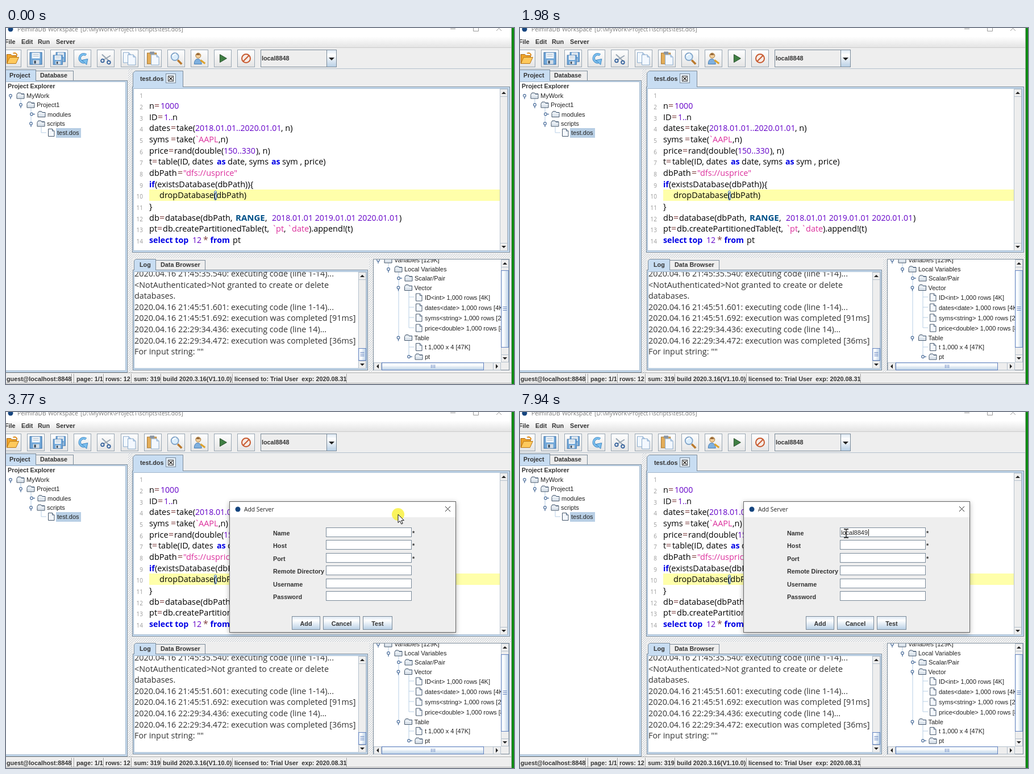
Animation of 894x626 px, one loop 8 s. Source, as an HTML page:

```html
<!DOCTYPE html>
<html lang="en">
<head>
<meta charset="utf-8">
<title>Workspace</title>
<style>
html, body { margin: 0; width: 100%; height: 100%; overflow: hidden; background: #eee; }
svg { display: block; width: 100%; height: 100%; }
text { white-space: pre; font: 11px "Liberation Sans", Arial, sans-serif; fill: #222; }
.b { font-weight: bold; font-size: 10.8px; fill: #333; }
.title { font: 10.3px "Open Sans", sans-serif; }
.code, .num, .str, .op, .key, .range { font: 14.5px "Open Sans", sans-serif; fill: #000; }
.num { font-size: 14.1px; fill: #6400c8; }
.str { fill: #dc2f9c; }
.op { font-size: 16px; fill: #804040; }
.key { font-weight: bold; font-size: 14.2px; fill: #0000e6; }
.range { font-weight: bold; font-size: 15px; fill: #005088; }
.line { font: 10px "Open Sans", sans-serif; fill: #999; text-anchor: end; }
.log { font: 14.36px "Open Sans", sans-serif; fill: #333; }
.mid { text-anchor: middle; }
</style>
</head>
<body>
<svg viewBox="0 0 894 626" preserveAspectRatio="none">
  <defs>
    <linearGradient id="metal" x2="0" y2="1">
      <stop stop-color="#dde8f3"/><stop offset=".3" stop-color="#fff"/><stop offset="1" stop-color="#b8cfe5"/>
    </linearGradient>
    <linearGradient id="metalX">
      <stop stop-color="#dde8f3"/><stop offset=".3" stop-color="#fff"/><stop offset="1" stop-color="#b8cfe5"/>
    </linearGradient>
    <linearGradient id="bar" x2="0" y2="1"><stop stop-color="#fff"/><stop offset="1" stop-color="#e4e4e4"/></linearGradient>
    <pattern id="bumps" width="4" height="4" patternUnits="userSpaceOnUse">
      <path d="M0 0h1v1h-1zM2 2h1v1h-1z" fill="#fff"/><path d="M1 1h1v1h-1zM3 3h1v1h-1z" fill="#a8b4c0"/>
    </pattern>
    <filter id="shadow" x="-10%" y="-10%" width="120%" height="125%">
      <feDropShadow dx="0" dy="2" stdDeviation="4" flood-opacity=".3"/>
    </filter>
    <clipPath id="logClip"><path d="M226 429H620V598H226Z"/></clipPath>
    <clipPath id="varClip"><path d="M647 407H871V588H647Z"/></clipPath>
  </defs>
  <g id="app"></g>
  <g id="dialog"></g>
  <circle id="halo" r="11" fill="#f8ee18" opacity=".7"/>
  <g id="menu"></g>
  <path id="arrow" d="M0 0V14.6L3.4 11.5L5.8 17L8.2 16L5.8 10.6H10.4Z" fill="#fff" stroke="#111"/>
  <path id="beam" d="M-4 -7.5H-1L0 -6.5L1 -7.5H4M0 -6.5V6.5M-4 7.5H-1L0 6.5L1 7.5H4" fill="none" stroke="#111" stroke-width="1.3"/>
</svg>
<script>
const $ = id => document.getElementById(id);
const EDGE = '#7a8a99', BLUE = '#c8ddf2', SELECT = '#b8cfe5';

const esc = s => s.replace(/&/g, '&amp;').replace(/</g, '&lt;');
const text = (x, y, s, cls = '') => `<text x="${x}" y="${y}" class="${cls}">${esc(s)}</text>`;
const fill = (x, y, w, h, color) => `<rect x="${x}" y="${y}" width="${w}" height="${h}" fill="${color}"/>`;
const box = (x, y, w, h, color, edge = EDGE) =>
  `<rect x="${x + .5}" y="${y + .5}" width="${w - 1}" height="${h - 1}" fill="${color}" stroke="${edge}"/>`;
const path = (d, color = 'none', edge = 'none', width = 1) =>
  `<path d="${d}" fill="${color}" stroke="${edge}" stroke-width="${width}"/>`;
const disc = (x, y, r, color, edge = 'none', width = 1) =>
  `<circle cx="${x}" cy="${y}" r="${r}" fill="${color}" stroke="${edge}" stroke-width="${width}"/>`;
const at = (x, y, body) => `<g transform="translate(${x} ${y})">${body}</g>`;
const button = (x, y, w, h) => box(x, y, w, h, 'url(#metal)');

// Triangle heads for scroll bars, by direction
const heads = { up: 'M-4 2L0 -2L4 2Z', down: 'M-4 -2L0 2L4 -2Z', left: 'M2 -4L-2 0L2 4Z', right: 'M-2 -4L2 0L-2 4Z' };
const scrollButton = (x, y, dir) => box(x, y, 14, 14, '#eee', '#b4c0cc') + at(x + 7, y + 7, path(heads[dir], '#222'));
const vScroll = (x, y, h) => box(x, y, 14, h, '#eee', '#b4c0cc') + scrollButton(x, y, 'up') + scrollButton(x, y + h - 14, 'down');
const grip = (x, y) => path(`M${x - 3} ${y - 2.5}h7m-7 3h7m-7 3h7`, 'none', '#6382bf');

const folder = (x, y) => at(x, y, path('M.5 3.5L2.5 .5H7L8.5 2.5H13.5V10.5H.5Z', '#dde5ed', '#44566b') +
  path('M1 4.5H13', 'none', '#fff') + path('M8.5 2.5H13.5', 'none', '#364f6d'));
const sheet = (x, y) => at(x, y, path('M.5 .5H7.5L11 4V13.5H.5Z', '#f4f8fd', '#44566b') + path('M7.5 .5V4H11', '#dce8f6', '#44566b'));
const handle = (x, y, open) => path(open ? `M${x} ${y + 2}V${y + 6}` : `M${x + 2} ${y}H${x + 6}`, 'none', '#4d6f9c', 1.3) +
  disc(x, y, 2.3, '#fff', '#4d6f9c', 1.2);
const branch = (x, y, s, open) => handle(x, y, open) + folder(x + 10.5, y - 5.5) + text(x + 28, y + 4, s);
const leaf = (x, y, s) => sheet(x, y - 7) + text(x + 16, y + 4, s);

const floppy = (x, y, s) => at(x, y, `<g transform="scale(${s})">` + box(0, 0, 22, 22, '#6fa6d8', '#3a6ea5') +
  fill(4, 1, 14, 10, '#f2f6fa') + path('M6 4H16M6 7H16', 'none', '#a8bacb') + fill(6, 14, 11, 7, '#d4dde6') + fill(8, 15, 3, 5, '#345') + '</g>');
const page = (x, y) => at(x, y, path('M.5 .5H10L14 4.5V18.5H.5Z', '#f3f8ff', '#8aaacb') + path('M10 .5V4.5H14', '#bcd5f0', '#8aaacb'));

const icons = [
  path('M-10 9V-7H-3L-1 -5H7V-1', '#f0a428', '#a86410') + path('M-10 9L-5 -2H11L6 9Z', '#ffc95c', '#b87618') + path('M1 -9Q7 -11 8 -5', 'none', '#e08a18', 2),
  floppy(-11, -11, 1),
  floppy(-6, -11, .78) + floppy(-11, -6, .78),
  path('M6 -6A7 7 0 1 0 5 6', 'none', '#3f86c4', 4.5) + path('M6 -6A7 7 0 1 0 5 6', 'none', '#7cc0ee', 2.8) + path('M-1 3L9 1L7 11Z', '#7cc0ee', '#3f86c4'),
  path('M-7 -7L5 4M8 -5L-5 3', 'none', '#97a5b3', 2) + disc(-6, 4, 2.8, 'none', '#315f9b', 1.8) + disc(5, 7, 2.8, 'none', '#315f9b', 1.8),
  page(-11, -11) + page(-3, -7),
  box(-10, -10, 17, 20, '#e3ad5a', '#a87428') + fill(-5, -12, 8, 5, '#8a96a4') + page(-3, -7),
  path('M3 3L10 10', 'none', '#b9782c', 3.5) + disc(-2, -3, 6.5, '#dceefc', '#7fa3c8', 1.8) + path('M-6 -4Q-4 -8 0 -8', 'none', '#fff', 2),
  path('M-9 10Q-9 1 -3 1T4 10Z', '#7fb0de', '#4a7fb5') + disc(-2, -5, 4.5, '#f3cf9c', '#a87c3c') + path('M-6 -6Q-3 -12 2 -6Z', '#8a5a2c') + path('M2 3L10 9', 'none', '#dda22c', 3),
  path('M-5 -7L7 0L-5 7Z', '#3f7f42', '#2c5230'),
  disc(0, 0, 7.5, '#f6ece6', '#c85a30', 2) + path('M-5 5L5 -5', 'none', '#c85a30', 2)
];

const code = [
  [],
  [[252, 'n'], [261, '=', 'op'], [272, '1000', 'num']],
  [[252, 'ID'], [267, '=', 'op'], [278, '1..', 'num'], [293, 'n']],
  [[252, 'dates'], [290, '=', 'op'], [300, 'take('], [333, '2018.01.01..2020.01.01', 'num'], [484, ', n)']],
  [[252, 'syms'], [290, '=', 'op'], [300, 'take('], [332, '`', 'str'], [339, 'AAPL', 'str'], [374, ',n)']],
  [[252, 'price'], [286, '=', 'op'], [296, 'rand(double('], [383, '150..330', 'num'], [440, '), n)']],
  [[252, 't'], [257, '=', 'op'], [268, 'table(ID, dates '], [371, 'as', 'key'], [390, 'date, syms '], [467, 'as', 'key'], [486, 'sym , price)']],
  [[252, 'dbPath'], [302, '=', 'op'], [312, '"dfs://usprice"', 'str']],
  [[252, 'if', 'key'], [262, '(existsDatabase(dbPath)){']],
  [[270, 'dropDatabase(dbPath)']],
  [[252, '}']],
  [[252, 'db'], [270, '=', 'op'], [280, 'database(dbPath, '], [404, 'RANGE', 'range'], [456, ','], [468, '2018.01.01 2019.01.01 2020.01.01', 'num'], [692, ')']],
  [[252, 'pt'], [266, '=', 'op'], [276, 'db.createPartitionedTable(t, '], [468, '`', 'str'], [475, 'pt', 'str'], [489, ','], [495, '`', 'str'], [503, 'date', 'str'], [533, ').append!(t)']],
  [[252, 'select top', 'key'], [328, '12', 'num'], [347, '*', 'op'], [359.5, 'from', 'key'], [399, 'pt']]
];

const log = [
  '2020.04.16 21:45:35.540: executing code (line 1-14)...',
  '<NotAuthenticated>Not granted to create or delete',
  'databases.',
  '2020.04.16 21:45:51.601: executing code (line 1-14)...',
  '2020.04.16 21:45:51.692: execution was completed [91ms]',
  '2020.04.16 22:29:34.436: executing code (line 14)...',
  '2020.04.16 22:29:34.472: execution was completed [36ms]',
  'For input string: ""'
];

function frame() {
  const tools = icons.map((icon, i) => box(-4 + Math.round(41.1 * i), 38, 31, 31, 'url(#bar)', '#98a6b3') + at(11.5 + 41.1 * i, 53.5, icon)).join('');
  return fill(0, 0, 894, 626, '#eee') + fill(0, 0, 889, 15, '#fff') +
    disc(8, 2, 4.5, '#15457f') +
    `<g id="caption">${text(20, 5.5, 'PelmiraDB', 'title')}${text(74, 5.5, 'Workspace', 'title')}${text(131, 5.5, '[D:\\MyWork\\Project1\\scripts\\test.dos]', 'title')}</g>` +
    '<path id="controls" d="M782 1.5H791M822.5 -4V5.5H831.5V-4M863 -4L872 5M872 -4L863 5" fill="none"/>' +
    fill(0, 15, 889, 19, 'url(#bar)') + fill(0, 34, 889, 1, '#ccc') + '<g id="menuHead"></g>' +
    [[-2, 'File'], [27, 'Edit'], [56, 'Run'], [88, 'Server']].map(([x, s]) => text(x, 28, s, 'b')).join('') +
    fill(0, 71, 889, 1, '#b4c0cc') + tools +
    box(448, 38, 134, 31, '#eee') + button(564, 38, 18, 31) + path('M568 52H578L573 57Z', '#222') + text(450, 57, 'local8848', 'b');
}

function projectPanel() {
  return box(-2, 73, 55, 22, BLUE) + box(52, 75, 67, 18, '#eee') + box(-2, 92, 216, 514, BLUE) +
    fill(0, 91, 52, 4, BLUE) + fill(0, 95, 211, 508, '#fff') + path('M0 94.5H210.5V602.5H0', 'none', '#a3b8cc') +
    text(6, 87, 'Project', 'b') + text(60, 87, 'Database', 'b') + text(3, 106, 'Project Explorer', 'b') +
    path('M26 124V135M44 140V168M62 174V184H71', 'none', SELECT) +
    branch(8, 119, 'MyWork', true) + branch(26, 135, 'Project1', true) +
    branch(45, 151.5, 'modules') + branch(44, 168, 'scripts', true) +
    fill(88, 176, 44, 17, SELECT) + leaf(74, 184, 'test.dos') +
    fill(214, 73, 8, 533, 'url(#bumps)');
}

function editorPanel() {
  const lines = code.map((tokens, i) => {
    const y = 142 + 19.65 * (i - 1);
    return text(241, y + 1, String(i + 1), 'line') + tokens.map(([x, s, cls = 'code']) => text(x, y, s, cls)).join('');
  }).join('');
  return box(222, 103, 665, 292, BLUE) + path('M223.5 104V79L227.5 75.5H311.5V104', BLUE, EDGE) + fill(224, 103, 87, 2, BLUE) +
    text(236, 93, 'test.dos', 'b') + box(281, 80, 18, 17, '#e4eef8') + box(285, 84, 10, 10, '#fff', '#333') +
    path('M287 86L293 92M293 86L287 92', 'none', '#222', 1.4) +
    box(224, 106, 660, 286, '#fff', '#a3b8cc') + fill(252, 284, 617, 20, '#ffffaa') +
    '<rect x="366.5" y="286.5" width="4" height="16" rx="2" fill="#eaf2ff" stroke="#3a6ea5"/>' + lines +
    vScroll(869, 107, 285) + fill(222, 397, 667, 8, 'url(#bumps)');
}

function logPanel() {
  return box(223, 425, 414, 177, BLUE) + path('M225.5 426V409L228.5 406.5H263.5V426', BLUE, EDGE) + box(263, 408, 88, 18, '#eee') +
    fill(226, 425, 37, 2, BLUE) + text(235, 420, 'Log', 'b') + text(272, 420, 'Data Browser', 'b') +
    box(225, 428, 410, 171, '#fff', '#a3b8cc') +
    `<g clip-path="url(#logClip)">${log.map((s, i) => text(226, 437 + 19.6 * i, s, 'log')).join('')}</g>` +
    vScroll(620, 429, 170) + box(620, 563, 14, 22, 'url(#metalX)', '#6382bf') + grip(626.5, 573) +
    fill(638, 406, 8, 199, 'url(#bumps)');
}

function variablesPanel() {
  const vectors = ['ID<int> 1,000 rows [4K]', 'dates<date> 1,000 rows [4K]', 'syms<string> 1,000 rows [20K]', 'price<double> 1,000 rows [8K]'];
  return box(646, 406, 240, 196, '#fff') + '<g clip-path="url(#varClip)">' +
    path('M673 413V424M691 429V545M709 462V527M709 473H718M709 491H718M709 509H718M709 527H718M709 549V578M709 561H718', 'none', SELECT) +
    branch(655, 408, 'Variables [129K]', true) + branch(673, 424, 'Local Variables', true) +
    branch(691, 440, 'Scalar/Pair') + branch(690.5, 456.5, 'Vector', true) +
    vectors.map((s, i) => leaf(721, 473.5 + 18 * i, s)).join('') +
    branch(690.5, 544.5, 'Table', true) + leaf(721, 561, 't 1,000 x 4 [47K]') + branch(709, 578, 'pt') + '</g>' +
    vScroll(871, 407, 181) + box(871, 426, 14, 136, 'url(#metalX)', '#6382bf') + grip(877.5, 493) +
    box(647, 588, 224, 14, '#eee', '#b4c0cc') + scrollButton(647, 588, 'left') + scrollButton(857, 588, 'right') +
    fill(871, 588, 14, 13, '#eee') +
    box(661, 588, 180, 14, 'url(#metal)', '#6382bf') + path('M748.5 592v6m3 -6v6m3 -6v6', 'none', '#6382bf');
}

function statusBar() {
  const cells = [[1, 'guest@localhost:8848'], [124, 'page: 1/1'], [175, 'rows: 12'], [225, 'sum: 319'],
    [276, 'build 2020.3.16(V1.10.0)'], [402, 'licensed to: Trial User  exp: 2020.08.31']];
  return fill(0, 606, 889, 1, '#a8a8a8') + fill(0, 607, 889, 1, '#fff') +
    cells.map(([x, s]) => text(x, 620.5, s, 'b')).join('') +
    [115, 119, 171, 220, 272, 398, 599].map(x => fill(x, 608, 1, 16, '#999') + fill(x + 1, 608, 1, 16, '#fff')).join('') +
    fill(0, 624, 889, 1, '#aaa') + '<path id="edge" d="M889.5 0V626" fill="none"/>' + fill(890, 0, 4, 626, '#0c8a12');
}

function dialogBody() {
  const rows = ['Name', 'Host', 'Port', 'Remote Directory', 'Username', 'Password'].map((label, i) => {
    const y = Math.round(46 + 22.4 * i);
    return text(77, y + 13.5, label, 'b') + box(170, y, 151, 17, '#fff') + (i < 3 ? text(322, y + 14, '*', 'b') : '');
  }).join('');
  const buttons = [[110, 50, 'Add'], [165, 65, 'Cancel'], [235, 52, 'Test']]
    .map(([x, w, s]) => button(x, 202, w, 24) + text(x + w / 2, 218.5, s, 'b mid')).join('');
  return `<g filter="url(#shadow)">${box(0, 0, 399, 231, '#eee', '#666')}</g>` + fill(1, 1, 397, 27, '#fff') +
    disc(15, 14, 4.5, '#15457f') + text(26, 18, 'Add Server', 'title') + path('M380 9L389 18M389 9L380 18', 'none', '#222') +
    rows + buttons + text(172, 59, '', 'typed') + '<path id="caret" d="M.5 49V61" stroke="#222"/>';
}

$('app').innerHTML = frame() + projectPanel() + editorPanel() + logPanel() + variablesPanel() + statusBar();
$('dialog').innerHTML = dialogBody();
$('menuHead').innerHTML = fill(82, 15, 44, 20, '#a3b8cc');
$('menu').innerHTML = box(82, 35, 76, 44, '#eee', '#6382bf') + '<g id="hover">' + fill(83, 37, 74, 18, '#a3b8cc') +
  fill(83, 37, 74, 1, '#6382bf') + fill(83, 55, 74, 1, '#6382bf') + '</g>' + text(88, 50.5, 'Add Server', 'b') + text(88, 72.5, 'Edit Server', 'b');
const typed = document.querySelector('.typed');

// Pointer: time, x, y, shape, halo
const approach = Array.from({ length: 11 }, (_, i) => {
  const p = i / 10, e = p * p * (3 - 2 * p);
  return [130 + 77 * i, 687 - 598 * e, 505 - 456 * e, 'arrow', 1];
});
const pointer = [
  [0, 0, 0, '', 0], ...approach,
  [980, 92, 38, 'arrow', 1], [1057, 98, 28, 'arrow', 1], [1133, 101, 25, 'arrow', 1],
  [1287, 104, 34, 'arrow', 1], [1363, 108, 43, 'arrow', 1], [1440, 112, 50, 'arrow', 1],
  [1827, 80, 62, 'arrow', 1], [1903, 36, 90, 'arrow', 1], [1980, 0, 0, '', 0],
  [3460, 36, 223, 'arrow', 1], [3537, 108, 197, 'arrow', 1], [3610, 225, 177.5, 'arrow', 1],
  [3690, 470, 165, 'arrow', 1], [3770, 690, 180, 'arrow', 1],
  [3920, 660, 190, 'arrow', 1], [4000, 618, 208, 'arrow', 1], [4075, 588, 221, 'arrow', 1], [4150, 577, 223, 'arrow', 1],
  [4300, 576, 221, 'arrow', 1], [4380, 578, 217, 'beam', 1], [4460, 580, 213, 'beam', 1], [4535, 582, 210, 'beam', 1],
  [4610, 583, 209, 'beam', 1], [4760, 579, 211, 'beam', 1], [4840, 574, 213.5, 'beam', 1], [4920, 574, 213.5, 'beam', 0]
];
// Field: time, typed length, caret x (0 = caret off)
const typing = [
  [0, 0, 0], [4920, 0, 172], [5380, 0, 0], [5610, 1, 175], [5840, 2, 181], [6300, 3, 187], [6380, 4, 193],
  [6460, 5, 195], [6990, 5, 0], [7450, 6, 201], [7620, 7, 208], [7770, 8, 214], [7940, 9, 220]
];

const stepAt = (table, t) => table.findLast(row => row[0] <= t);
const show = (id, on) => $(id).style.display = on ? '' : 'none';
const move = (id, x, y) => $(id).setAttribute('transform', `translate(${x} ${y})`);

function render(t) {
  const [, x, y, shape, halo] = stepAt(pointer, t);
  for (const id of ['arrow', 'beam', 'halo']) {
    show(id, id === 'halo' ? halo : id === shape);
    move(id, x, y);
  }
  const active = t >= 1210 && t < 1750;
  show('menu', active);
  show('menuHead', active);
  show('hover', t >= 1363);
  $('caption').style.opacity = active ? 1 : .6;
  $('controls').setAttribute('stroke', active ? '#111' : '#999');
  $('edge').setAttribute('stroke', active ? '#555' : '#aaa');

  show('dialog', t >= 3460);
  const [, dragX, dragY] = stepAt(pointer, Math.min(t, 3770));
  move('dialog', Math.round(dragX - 297), Math.round(dragY - 23));

  const [, count, caretX] = stepAt(typing, t);
  typed.textContent = 'local8849'.slice(0, count);
  show('caret', caretX);
  move('caret', caretX, 0);
}

const start = performance.now();
function tick() {
  render((performance.now() - start) % 8000);
  requestAnimationFrame(tick);
}
tick();
</script>
</body>
</html>
```
